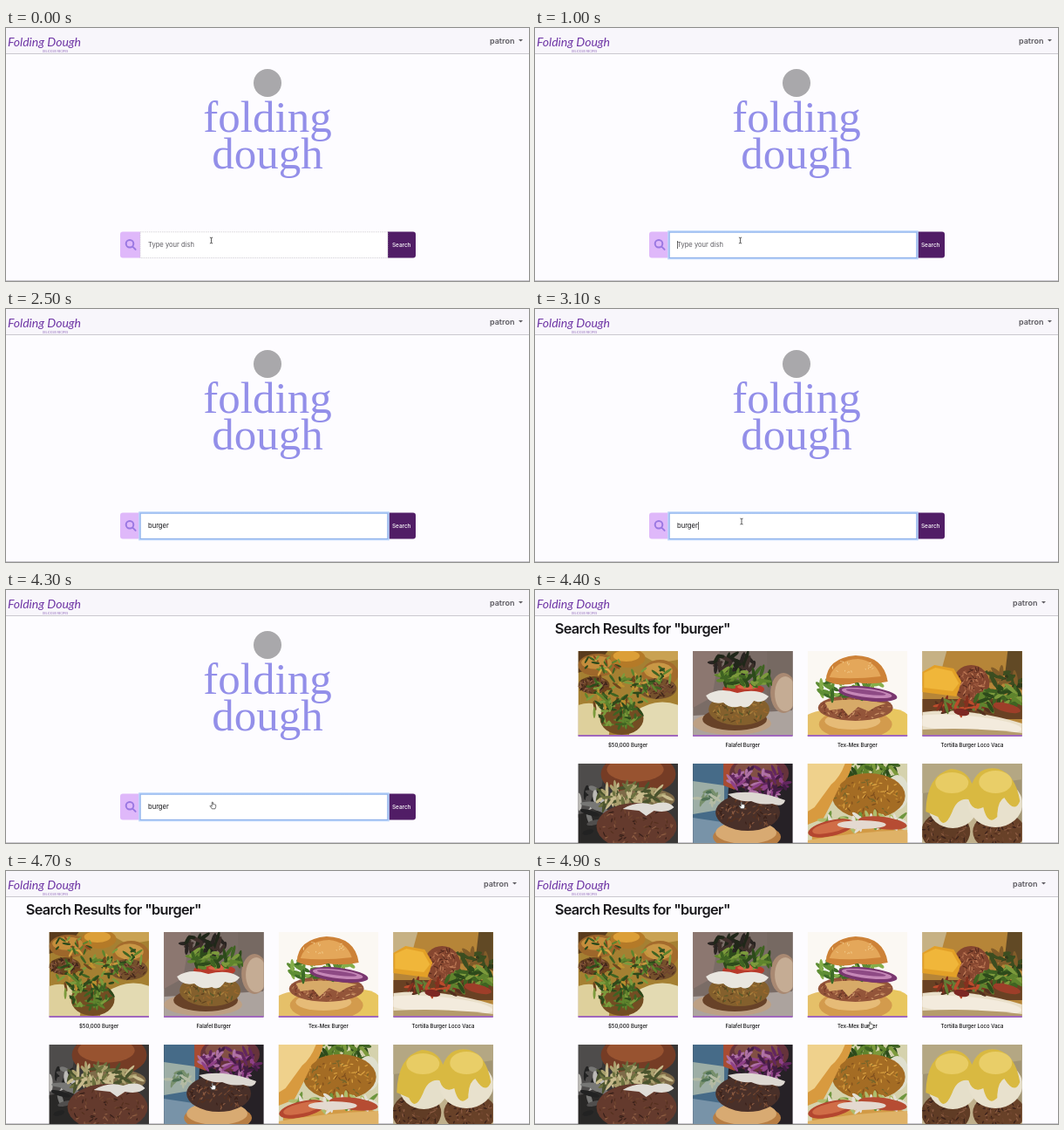
Recreate the animation shown at these times as an HTML page. Size 600 by 290 pixels, loop 5000 ms.

```html
<!DOCTYPE html>
<html lang="en">
<head>
<meta charset="utf-8">
<title>Recipe search</title>
<style>
  html, body { margin: 0; width: 100%; height: 100%; overflow: hidden; background: #fdfcff; }
  #stage { display: block; width: 100%; height: 100%; }
  text { font-family: Inter, "Open Sans", sans-serif; }
  .hero { font: 51px "Liberation Serif", serif; fill: #938fe9; text-anchor: middle; }
  .brand { font: italic 14px Lato, sans-serif; fill: #6e35a5; }
  .title { font-size: 16.3px; font-weight: 600; letter-spacing: -.037em; fill: #18171b; }
  .caption { font-size: 6px; font-weight: 500; fill: #111; text-anchor: middle; }
</style>
</head>
<body>
<svg id="stage" viewBox="0 0 600 290">
  <rect width="600" height="290" fill="#fdfcff"/>
  <rect width="600" height="29" fill="#f8f6fb"/>
  <path d="M0 29.5H600M0 289.5H600" stroke="#cbc9cf"/>
  <text class="brand" x="2" y="21">Folding Dough</text>
  <text x="42" y="27.8" font-size="3" fill="#8b62b8">DELICIOUS RECIPES</text>
  <g id="account">
    <text x="555" y="17.7" font-size="9" font-weight="600" fill="#5c5a60">patron</text>
    <path d="M588 13h5l-2.5 2.6z" fill="#5c5a60"/>
  </g>

  <g id="search">
    <circle cx="300" cy="63" r="16" fill="#a9a8ab"/>
    <text class="hero" x="300" y="119">folding</text>
    <text class="hero" x="300" y="161">dough</text>
    <path d="M154 233.5h-20q-3 0-3 3v24q0 3 3 3h20z" fill="#dfb8fa"/>
    <g fill="none" stroke="#9a78e2" stroke-width="2" stroke-linecap="round">
      <circle cx="142" cy="247.3" r="4.3"/>
      <path d="M145.3 250.6l3.3 3.3"/>
    </g>
    <path d="M438 233.5h29q3 0 3 3v24q0 3-3 3h-29z" fill="#511d66"/>
    <text x="453.7" y="251" font-size="6.4" font-weight="500" fill="#fff" text-anchor="middle">Search</text>
    <rect x="154" y="233.8" width="284" height="29.7" fill="#fff" stroke="#c9c8cc" stroke-width=".7" stroke-dasharray="1.5 1"/>
    <g id="focus" fill="none">
      <rect x="153.5" y="233.5" width="285" height="30.5" stroke="#bcd6fb" stroke-width="2.6"/>
      <rect x="154" y="234" width="284" height="29.5" stroke="#84a9e5" stroke-width=".8"/>
    </g>
    <text id="query" x="163" y="251" font-size="7.6"></text>
    <rect id="caret" y="244" width=".7" height="9" fill="#222"/>
  </g>

  <g id="results">
    <text class="title" x="22.7" y="50">Search Results for "burger"</text>
    <g id="cards"></g>
  </g>

  <path id="beam" d="M-1.6-3.4q1.6 0 1.6 1v4.8q0 1-1.6 1M1.6-3.4q-1.6 0-1.6 1M0 2.4q0 1 1.6 1" fill="none" stroke="#333" stroke-width=".8"/>
  <path id="hand" d="M-1.3-3.6q.8-.7 1.3 0v2.3q.8-.6 1.1.1q.8-.5 1.1.2q1-.2 1 .7v1.8l-.8 2.3h-3.6l-2.2-3.2q.3-1.1 1.2-.2l.9.7z" fill="#fff" stroke="#333" stroke-width=".7"/>
</svg>
<script>
const $ = id => document.getElementById(id);

let seed = 11;
const random = () => (seed = seed * 16807 % 2147483647) / 2147483647;
const oval = (x, y, rx, ry, fill, turn = 0) =>
  `<ellipse cx="${x}" cy="${y}" rx="${rx}" ry="${ry}" fill="${fill}" transform="rotate(${turn} ${x} ${y})"/>`;
const shape = (d, fill) => `<path d="${d}" fill="${fill}"/>`;
const ground = fill => `<rect width="115" height="98" fill="${fill}"/>`;

// Small turned ovals spread over an elliptic area: leaves, crumbs, shreds.
function scatter(x, y, rx, ry, count, size, colours) {
  let out = '';
  for (let i = 0; i < count; i++) {
    const angle = random() * 2 * Math.PI, reach = Math.sqrt(random());
    out += oval((x + rx * reach * Math.cos(angle)).toFixed(1), (y + ry * reach * Math.sin(angle)).toFixed(1),
      size * (.7 + random()), size * .36, colours[i % colours.length], Math.round(random() * 180));
  }
  return out;
}
const greens = ['#3f6322', '#5f842d', '#2d4a1b', '#7c9a3c'];
const meats = ['#55301f', '#8a5a41', '#3a211a', '#70452f'];
const patty = (x, y, rx, ry, base = '#60392a', specks = meats) =>
  oval(x, y, rx, ry, base) + scatter(x, y, rx * .93, ry * .87, 90, 2, specks);
const bun = (x, y, rx, ry, fill, shine) =>
  oval(x, y, rx, ry, fill) + oval(x - rx * .08, y - ry * .22, rx * .76, ry * .58, shine);

const photos = [
  ['$50,000 Burger', () => ground('#a58032') + shape('M0 0H34L20 18L0 25Z', '#5a3c1d') + shape('M65 0H115V10L90 14Z', '#c9a253')
    + shape('M0 62Q22 54 39 73L35 98H0Z', '#ded09c') + shape('M64 70Q89 52 115 62V98H58Z', '#e3dab2')
    + bun(23, 16, 23, 13, '#9d672b', '#c48d3c') + bun(57, 8, 20, 11, '#b47a28', '#dc9f38') + bun(94, 26, 21, 16, '#a36b2c', '#c99745')
    + patty(18, 39, 18, 10, '#68451f') + patty(91, 43, 22, 12, '#75512c') + oval(50, 77, 25, 19, '#734d23')
    + scatter(44, 48, 37, 21, 75, 4, [...greens, '#bd9130', '#71451d'])
    + scatter(83, 31, 24, 15, 32, 4, [...greens, '#c5953c']) + scatter(45, 71, 28, 17, 45, 4.2, greens)
    + scatter(27, 15, 22, 10, 24, 3.2, ['#d9a344', '#8c4b20', ...greens])],
  ['Falafel Burger', () => ground('#7a6c66') + shape('M0 0H31L22 53L0 65Z', '#8c7770') + shape('M85 0H115V67H86Z', '#766962')
    + shape('M0 74L115 68V98H0Z', '#aca39e') + oval(104, 48, 15, 23, '#a98972') + oval(106, 49, 12, 20, '#c5ac94')
    + oval(45, 83, 45, 13, '#bda084') + oval(48, 78, 37, 13, '#684228')
    + patty(53, 67, 35, 18, '#84602d', ['#a77e3b', '#60421f', '#5a5929', '#9b682d'])
    + scatter(47, 16, 23, 14, 40, 6, ['#292421', '#3f302b', '#202719'])
    + oval(58, 44, 24, 7, '#b83a2a') + oval(63, 41, 12, 3, '#dc6345')
    + shape('M15 51Q30 41 51 48Q74 42 87 52Q80 61 70 57Q63 68 55 63Q43 67 35 59Q20 62 15 51Z', '#e9e6df')
    + scatter(58, 31, 34, 11, 46, 5.5, greens)],
  ['Tex-Mex Burger', () => ground('#fbf8f3') + shape('M0 73Q17 64 35 72V98H0Z', '#e5c069') + shape('M84 66Q107 64 115 73V98H70Z', '#e8c65f')
    + bun(55, 84, 42, 17, '#d39b4d', '#e6bb77')
    + patty(55, 65, 43, 15, '#93553a', ['#b77a51', '#6b3b28', '#c99267', '#813f2b'])
    + shape('M20 59Q45 52 90 60L78 64L70 69L58 64L47 74L40 66L25 68Z', '#d7aa68')
    + scatter(51, 43, 40, 11, 38, 6, ['#5f8e35', '#85ae4a', '#3d6b27'])
    + oval(69, 49, 34, 8, '#79366f', 7) + oval(68, 48, 29, 5, '#c587b7', 7) + oval(67, 47, 23, 2.5, '#8e4a85', 7)
    + shape('M21 34Q22 8 55 5Q88 6 92 35Q72 39 57 36Q37 42 21 34Z', '#cd8237')
    + shape('M25 30Q32 10 58 9Q78 11 84 29Q51 33 25 30Z', '#e4a75a') + scatter(53, 18, 25, 8, 18, 1.1, ['#f4d59a'])],
  ['Tortilla Burger Loco Vaca', () => ground('#b68538') + shape('M0 0H28L20 29L0 40Z', '#c6b184') + shape('M98 0H115V45L94 34Z', '#614925')
    + scatter(86, 35, 28, 13, 28, 7, ['#3c4d20', '#2d3b1a', '#825c29']) + shape('M0 55H115V78H0Z', '#694123')
    + shape('M0 70Q46 63 115 83V98H0Z', '#e9dfc9') + oval(51, 84, 63, 10, '#f3ebdd', 5)
    + shape('M0 90Q62 87 115 94V98H0Z', '#b59b6b') + patty(56, 37, 21, 21, '#85462f', ['#9e5a3f', '#582b1e', '#bd7a56'])
    + shape('M0 24L14 16L36 20L45 35L39 52L0 47Z', '#e3a027') + shape('M2 25L15 19L34 23L42 37L35 46L2 42Z', '#f0b63a')
    + scatter(48, 64, 34, 8, 37, 5, ['#84311f', '#bc4b2c', '#54301f', '#627d35'])
    + scatter(88, 53, 26, 12, 44, 6, greens) + oval(45, 70, 9, 4, '#7c2823', 10) + oval(97, 65, 16, 5, '#9e3e29', 14)],
  ['', () => ground('#393736') + shape('M0 0H31L24 47L0 62Z', '#4e4c4b') + shape('M0 58L29 53L37 98H0Z', '#292827')
    + scatter(12, 52, 15, 28, 17, 8, ['#777775', '#222', '#504e4d', '#bbb9b5'])
    + bun(69, 12, 43, 24, '#753c25', '#985330') + oval(73, 41, 38, 13, '#7e6a48')
    + scatter(62, 39, 42, 14, 85, 5, ['#c8bb8d', '#6c713f', '#aaa06e', '#4a532d'])
    + patty(67, 72, 46, 27, '#643a2d') + shape('M51 52Q68 42 85 47Q102 41 110 50Q103 57 87 54L78 60L70 54Z', '#e0ddd7')
    + oval(75, 99, 42, 7, '#8b512f')],
  ['', () => ground('#262126') + shape('M0 0H43L38 66L0 76Z', '#466b88') + shape('M0 20L36 25V52L0 58Z', '#9daea6')
    + shape('M35 0H64L48 30L35 25Z', '#a84c32') + shape('M0 62L40 68L42 98H0Z', '#7893a8')
    + bun(76, 11, 34, 20, '#66333b', '#825044') + oval(62, 84, 39, 15, '#b77d43') + oval(61, 79, 35, 13, '#d8aa72')
    + scatter(76, 22, 34, 18, 75, 5, ['#63265f', '#8e4188', '#431c44', '#af72a5'])
    + patty(63, 56, 37, 21, '#493029') + shape('M40 35Q69 28 106 42Q103 51 91 46Q77 48 67 43Q53 45 40 35Z', '#ddd8d2')
    + scatter(17, 39, 13, 9, 14, 5, ['#78906d', '#b4bba4', '#4f7155'])],
  ['', () => ground('#d5d2ad') + scatter(70, 10, 39, 15, 65, 6, greens) + oval(103, 33, 13, 20, '#dfdfce')
    + patty(70, 37, 42, 26, '#a46c24', ['#c58b31', '#77652a', '#daa242', '#81501d'])
    + shape('M0 0H51Q49 16 38 23Q30 41 18 63L0 70Z', '#d89a3f') + shape('M0 0H43Q37 16 27 24L8 50L0 55Z', '#efd18c')
    + oval(62, 86, 57, 18, '#d29a45') + scatter(65, 66, 48, 8, 38, 6, ['#e4dfd4', '#6e963e', '#aebc6c'])
    + oval(27, 74, 27, 9, '#b4462f', -13) + oval(27, 73, 22, 6, '#d06d47', -13) + oval(86, 68, 28, 7, '#b64c33', 7)
    + oval(62, 70, 28, 5, '#e4d9d0') + shape('M0 88Q55 78 115 76V98H0Z', '#dfb267')],
  ['', () => ground('#a19473') + shape('M0 0H115V18L0 34Z', '#b4a783') + oval(58, 85, 65, 29, '#bfb08c')
    + patty(27, 78, 28, 23, '#603c25') + patty(88, 78, 30, 22, '#684128')
    + oval(35, 49, 28, 25, '#e5dfca') + oval(84, 46, 31, 27, '#e8e1cd')
    + shape('M4 55Q5 13 33 6Q51 7 57 23Q65 2 87 6Q107 12 112 43Q106 58 94 39Q86 43 86 61Q75 72 70 50Q58 56 53 41Q40 39 34 56Q25 77 18 61Z', '#d9b941')
    + oval(34, 22, 19, 12, '#e8cc64') + oval(84, 21, 19, 13, '#e9ce68')]
];

$('cards').innerHTML = photos.map(([name, draw], i) => {
  const x = 49.5 + i % 4 * 131.6, y = i < 4 ? 70 : 199;
  return `<svg x="${x}" y="${y}" width="114.5" height="97" overflow="hidden">${draw()}</svg>`
    + `<rect x="${x}" y="${y + 96}" width="114.5" height="2" fill="#a067bd"/>`
    + `<text class="caption" x="${x + 57.2}" y="${y + 109.7}">${name}</text>`;
}).join('');

const show = (id, visible) => $(id).style.display = visible ? '' : 'none';
const place = (id, x, y) => $(id).setAttribute('transform', `translate(${x} ${y})`);

function render(time) {
  const t = Math.floor(time % 5000 / 100) * 100;
  const found = t >= 4400, focused = t >= 1000;
  const typed = 'burger'.slice(0, Math.max(0, Math.floor((t - 1100) / 100)));
  const query = $('query');

  show('search', !found);
  show('results', found);
  place('account', found ? -7 : 0, 0);

  if (!found) {
    query.textContent = typed || 'Type your dish';
    query.setAttribute('fill', typed ? '#151518' : '#5e5d63');
    show('focus', focused);
    show('caret', focused && (t < 1700 || (t - 1700) % 1000 < 500));
    $('caret').setAttribute('x', 163.3 + (typed ? query.getComputedTextLength() : 0));
  }

  show('beam', t < 1200 || t >= 2900 && t < 4200);
  place('beam', t < 1200 ? 235.5 : 237, 243.5);
  show('hand', t >= 4200);
  const glide = Math.min(1, Math.max(0, (t - 4700) / 200));
  place('hand', 237.5 + 147.5 * glide, 247 - 70 * glide);
}

function tick(now) {
  render(now);
  requestAnimationFrame(tick);
}
render(0);
requestAnimationFrame(tick);
</script>
</body>
</html>
```
